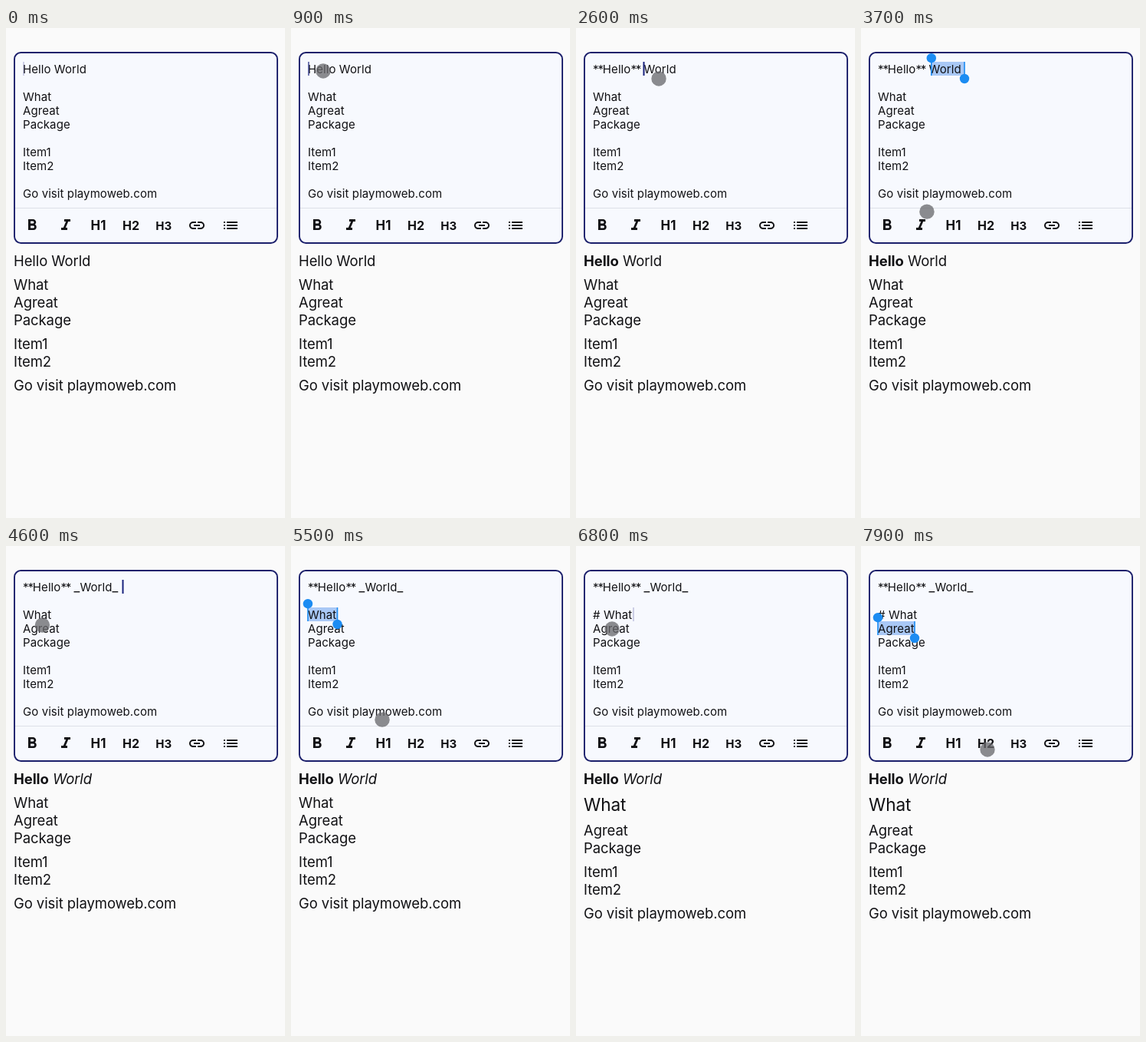
Animation, 364 px wide and 638 px high, one loop 8 s. Source, as an HTML page:

```html
<!DOCTYPE html>
<html lang="en">
<head>
<meta charset="utf-8">
<title>Markdown editor</title>
<style>
  html, body { margin: 0; width: 100%; height: 100%; overflow: hidden; background: #fafafa; }
  svg { display: block; width: 364px; height: 638px; }
  text { font-family: Inter, "Open Sans", sans-serif; fill: #111114; white-space: pre; }
  #editor text { font-size: 15px; letter-spacing: 0.08px; }
  #editor .star { letter-spacing: -1.1px; }
  #editor .under { font-size: 17px; }
  #preview text { font-size: 18.5px; letter-spacing: -0.08px; }
  #preview text.h1 { font-size: 22.6px; }
  .bold { font-weight: 700; }
  .italic { font-style: italic; }
  #tools text { font-weight: 700; text-anchor: middle; }
  #tools path { fill: #111114; }
</style>
</head>
<body>
<svg viewBox="0 0 364 638">
  <rect width="364" height="638" fill="#fafafa"/>
  <rect x="11" y="32" width="343" height="248" rx="8.4" fill="#f7f9fe" stroke="#1b1f6b" stroke-width="1.9"/>
  <path d="M12 234.5H353" stroke="#dde0e7"/>
  <rect id="mark" height="18" fill="#a9c8f6"/>
  <g id="editor"></g>
  <rect id="caret" width="2" height="18" fill="#1a237e"/>
  <g id="handles" fill="#1c8cf2">
    <rect width="1.6" height="18"/><circle r="6.2"/>
    <rect width="1.6" height="18"/><circle r="6.2"/>
  </g>
  <g id="tools">
    <path transform="translate(22 245)" d="M15.6 10.79c.97-.67 1.65-1.77 1.65-2.79 0-2.26-1.75-4-4-4H7v14h7.04c2.09 0 3.71-1.7 3.71-3.79 0-1.52-.86-2.82-2.15-3.42zM10 6.5h3c.83 0 1.5.67 1.5 1.5s-.67 1.5-1.5 1.5h-3v-3zm3.5 9H10v-3h3.5c.83 0 1.5.67 1.5 1.5s-.67 1.5-1.5 1.5z"/>
    <path transform="translate(66 245)" d="M10 4v3h2.21l-3.42 8H6v3h8v-3h-2.21l3.42-8H18V4z"/>
    <text x="120.5" y="263" font-size="16.8">H1</text>
    <text x="163" y="263" font-size="16">H2</text>
    <text x="205.7" y="263" font-size="15">H3</text>
    <path transform="translate(237 245)" d="M3.9 12c0-1.71 1.39-3.1 3.1-3.1h4V7H7c-2.76 0-5 2.24-5 5s2.24 5 5 5h4v-1.9H7c-1.71 0-3.1-1.39-3.1-3.1zM8 13h8v-2H8v2zm9-6h-4v1.9h4c1.71 0 3.1 1.39 3.1 3.1s-1.39 3.1-3.1 3.1h-4V17h4c2.76 0 5-2.24 5-5s-2.24-5-5-5z"/>
    <path transform="translate(281 245)" d="M3 13h2v-2H3v2zm0 4h2v-2H3v2zm0-8h2V7H3v2zm4 4h14v-2H7v2zm0 4h14v-2H7v2zM7 7v2h14V7H7z"/>
  </g>
  <g id="preview"></g>
  <circle id="pointer" r="9.7" fill="#68686c" fill-opacity=".76"/>
</svg>
<script>
const LOOP = 8000;
const NS = "http://www.w3.org/2000/svg";
const $ = id => document.getElementById(id);

function set(el, attrs) {
  for (const key in attrs) el.setAttribute(key, attrs[key]);
  return el;
}

function addText(group, x, y, content) {
  const el = set(document.createElementNS(NS, "text"), { x, y });
  el.textContent = content;
  return group.appendChild(el);
}

const lines = ["Hello World", "What", "Agreat", "Package", "Item1", "Item2", "Go visit playmoweb.com"];
const editorRows = [0, 2, 3, 4, 6, 7, 9];
const editorLines = lines.map((s, i) => addText($("editor"), 22, 59 + 18 * editorRows[i], s));
const previewY = [310, 341, 364, 387, 418, 441, 472];
const previewLines = lines.map((s, i) => addText($("preview"), 10, previewY[i], s));

const span = (cls, s) => `<tspan class="${cls}">${s}</tspan>`;
const stars = span("star", "**");
const under = span("under", "_");
const boldSource = stars + "Hello" + stars;
const fullSource = `${boldSource} ${under}World${under}`;
const bold = span("bold", "Hello");
const fullPreview = `${bold} ${span("italic", "World")}`;

// Document states: what is typed, how it renders and where the caret sits
const states = [
  { at: -700, source: "Hello World", html: "Hello World", caret: [22, 44] },
  { at: 2300, source: boldSource + " World", html: bold + " World", caret: [87.5, 44] },
  { at: 4100, source: fullSource, html: fullPreview, caret: [151.5, 44] },
  { at: 6100, source: fullSource, html: fullPreview, caret: [74, 80], heading: true }
];

const selections = [
  { from: 1200, to: 2300, x1: 22, x2: 59, y: 44 },
  { from: 3300, to: 4100, x1: 91.8, x2: 135, y: 44 },
  { from: 5100, to: 6100, x1: 22, x2: 60.5, y: 80 },
  { from: 7100, to: LOOP, x1: 22, x2: 70, y: 98 }
];

// Pointer path: time, x, y
const path = [
  [300, -12, 26], [900, 42, 56], [1250, 42, 56],
  [1700, 48, 226], [2100, 35, 257], [2300, 35, 257],
  [2600, 108, 66], [2900, 112, 56], [3350, 112, 56],
  [3700, 86, 239], [3900, 78, 257], [4100, 78, 257],
  [4700, 45, 91], [5150, 45, 91],
  [5500, 119, 226], [5800, 120, 257], [6100, 120, 257],
  [6700, 47, 108], [7150, 47, 108],
  [7800, 165, 264.5], [7900, 165, 265], [LOOP, 165, 265]
];

const slope = (i, k) => (path[i + 1][k] - path[i][k]) / (path[i + 1][0] - path[i][0]);

// Tangent that never overshoots its neighbours
function tangent(i, k) {
  if (i === 0 || i === path.length - 1) return 0;
  const a = slope(i - 1, k), b = slope(i, k);
  return a * b > 0 ? 2 * a * b / (a + b) : 0;
}

function along(t, k) {
  let i = 0;
  while (i < path.length - 2 && t >= path[i + 1][0]) i++;
  const length = path[i + 1][0] - path[i][0];
  const u = Math.min(1, Math.max(0, (t - path[i][0]) / length));
  const s = u * u * (3 - 2 * u);
  return path[i][k] * (1 - s) + path[i + 1][k] * s
    + length * u * (1 - u) * ((1 - u) * tangent(i, k) - u * tangent(i + 1, k));
}

// Caret: half a second lit, then fades out, waits and fades back in
function blink(age) {
  const p = age % 1000;
  if (p < 500) return 1;
  if (p < 750) return (750 - p) / 250;
  return p < 900 ? 0 : (p - 900) / 100;
}

let shown = null;
function showState(state) {
  if (state === shown) return;
  shown = state;
  const heading = Boolean(state.heading);
  editorLines[0].innerHTML = state.source;
  editorLines[1].textContent = heading ? "# What" : "What";
  previewLines[0].innerHTML = state.html;
  previewLines[1].setAttribute("class", heading ? "h1" : "");
  previewLines.forEach((el, i) => {
    const shift = !heading || i === 0 ? 0 : i === 1 ? 4 : 13;
    el.setAttribute("y", previewY[i] + shift);
  });
}

function showSelection(sel) {
  const display = sel ? "inline" : "none";
  $("mark").style.display = $("handles").style.display = display;
  if (!sel) return;
  const { x1, x2, y } = sel;
  set($("mark"), { x: x1, y, width: x2 - x1 });
  const [stem1, knob1, stem2, knob2] = $("handles").children;
  set(stem1, { x: x1 - 0.8, y });
  set(knob1, { cx: x1, cy: y - 4.8 });
  set(stem2, { x: x2 - 0.8, y });
  set(knob2, { cx: x2, cy: y + 22 });
}

function render(t) {
  const state = states.filter(s => t >= s.at).pop();
  const sel = selections.find(s => t >= s.from && t < s.to);
  showState(state);
  showSelection(sel);
  const [x, y] = state.caret;
  set($("caret"), { x, y, opacity: sel ? 0 : blink(t - state.at) });
  set($("pointer"), { cx: along(t, 1), cy: along(t, 2) });
}

function tick(now) {
  render(now % LOOP);
  requestAnimationFrame(tick);
}
render(0);
requestAnimationFrame(tick);
</script>
</body>
</html>
```
